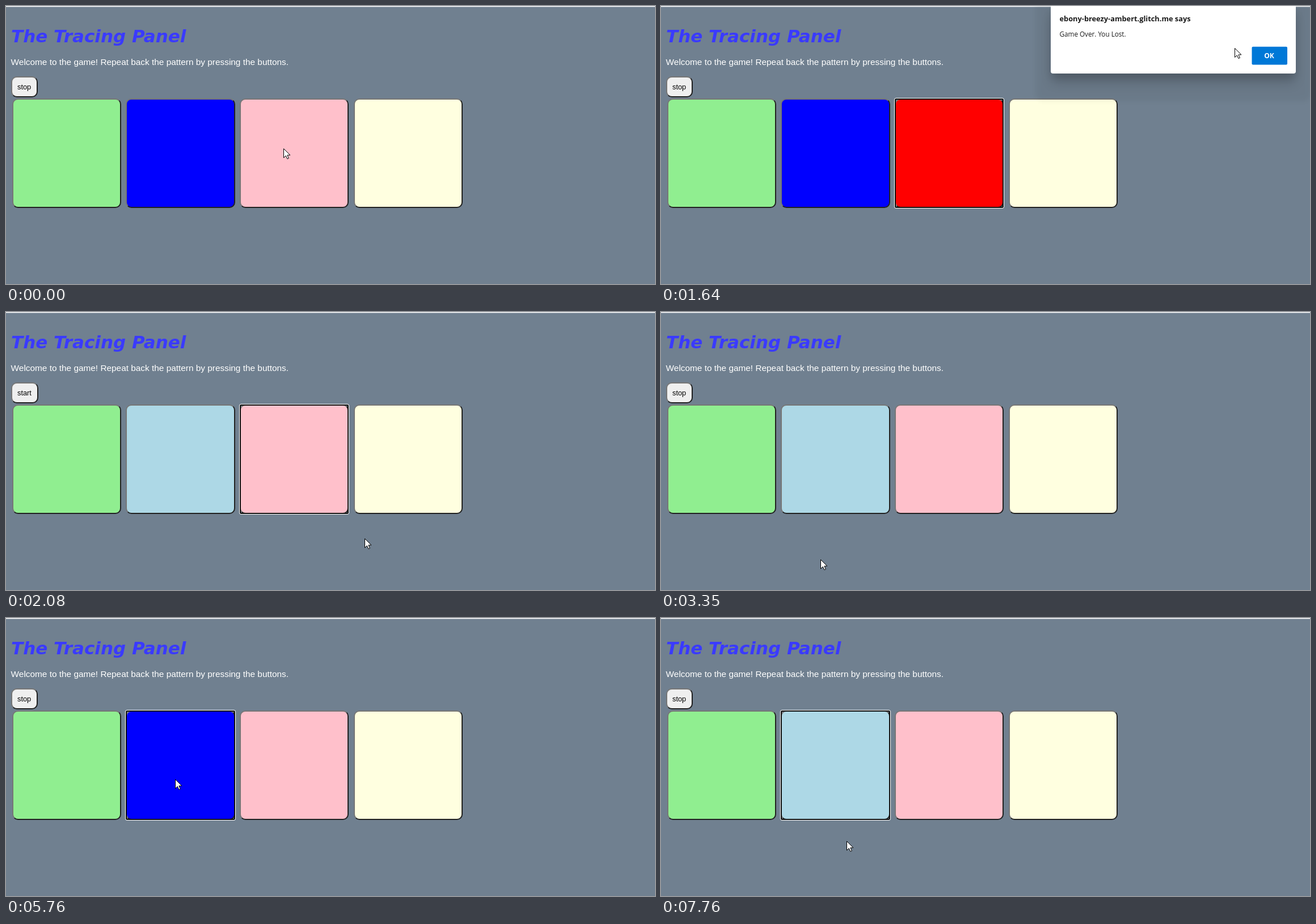
These frames come from a looping animation (1144 by 490 pixels, 8 s). An HTML page:

```html
<!DOCTYPE html>
<html lang="en">
<head>
<meta charset="utf-8">
<title>The Tracing Panel</title>
<style>
html, body { margin: 0; width: 100%; height: 100%; overflow: hidden; }
body { position: relative; background: #708090; }
svg { position: absolute; left: 0; top: 0; overflow: visible; }
text { white-space: pre; }
.strip { position: absolute; width: 100%; height: 1px; background: #fff; border-bottom: 1px solid #b9c1c9; }
.page text { font: 15.385px "Liberation Sans", sans-serif; fill: #fff; }
.page .title { font: italic bold 31px "DejaVu Sans", sans-serif; fill: #3a3aff; }
.tile, .toggle {
  position: absolute; box-sizing: border-box; border: 2px solid;
  border-color: #767676 #212121 #212121 #767676; border-radius: 10px;
}
.tile { top: 163.3px; width: 192.3px; height: 192.3px; }
.tile.focus::after {
  content: ""; position: absolute; inset: -2px; border: 2px solid #101010;
  border-radius: 3px; box-shadow: 0 0 0 1px #fff;
}
.toggle { left: 9px; top: 124px; height: 37px; background: #efefef; }
.toggle text { font: 12.8px "Liberation Sans", sans-serif; }
.dialog {
  position: absolute; left: 687px; top: 0; width: 432px; height: 119px;
  background: #fff; border-radius: 0 0 4px 4px;
  box-shadow: 0 6px 14px rgba(0,0,0,.12), 0 18px 20px -2px rgba(0,0,0,.16),
    0 22px 8px 27px rgba(0,0,0,.05);
}
.dialog text { font: 11.7px "Open Sans", sans-serif; fill: #1a1a1a; }
.dialog .host { font-weight: 700; font-size: 12.8px; }
.dialog .ok { font-weight: 700; font-size: 12px; fill: #fff; text-anchor: middle; }
</style>
</head>
<body>
<div class="strip"></div>
<svg class="page" width="1144" height="490">
  <text class="title" x="9" y="64">The Tracing Panel</text>
  <text x="8.6" y="104">Welcome to the game! Repeat back the pattern by pressing the buttons.</text>
</svg>
<div class="toggle"><svg width="40" height="30"><text id="label" x="9" y="21"></text></svg></div>
<div class="dialog">
  <svg width="432" height="119">
    <text class="host" x="15.5" y="27">ebony-breezy-ambert.glitch.me says</text>
    <text x="15.5" y="54">Game Over. You Lost.</text>
    <rect x="354.5" y="71.7" width="62.5" height="31.8" rx="2" fill="#0078d7"/>
    <text class="ok" x="385" y="92">OK</text>
  </svg>
</div>
<svg id="cursor" width="13" height="20">
  <path d="M.5.5V16.5L4.3 12.9 6.9 18.5 9.4 17.4 6.9 11.9H12Z" fill="#fff" stroke="#000"/>
</svg>
<script>
const LOOP = 8000;
const dialog = document.querySelector('.dialog');
const toggle = document.querySelector('.toggle');
const label = document.getElementById('label');
const cursor = document.getElementById('cursor');

const [, blue, pink] = ['#90ee90', '#add8e6', '#ffc0cb', '#ffffe0'].map((color, i) => {
  const tile = document.createElement('div');
  tile.className = 'tile';
  tile.style.left = 10.6 + 200.8 * i + 'px';
  tile.style.background = color;
  document.body.insertBefore(tile, dialog);
  return tile;
});

// Pointer gestures: start, end, target x, target y; the pointer rests in between.
const moves = [
  [250, 340, 502, 307], [450, 580, 535, 396], [580, 1040, 751, 87],
  [1060, 1640, 1011, 74], [1640, 1820, 1072, 85],
  [1870, 2080, 633, 400], [2080, 2590, 45, 140],
  [2690, 2960, 310, 451], [3300, 3350, 281, 436],
  [3590, 3890, 302, 423], [4480, 4530, 305, 412],
  [5570, 5740, 298, 284], [5820, 5970, 333, 396], [6660, 6770, 327, 393]
];

const clamp = v => Math.min(1, Math.max(0, v));
const progress = (t, from, to) => clamp((t - from) / (to - from));
const within = (t, from, to) => t >= from && t < to;

function pointAt(t) {
  let x = 489, y = 251;
  for (const [from, to, tx, ty] of moves) {
    const k = progress(t, from, to);
    x += (tx - x) * k;
    y += (ty - y) * k;
  }
  return [Math.round(x), Math.round(y)];
}

function render(t) {
  const cue = within(t, 3590, 4530) || within(t, 6770, 7760);
  const pressed = within(t, 5740, 5860);
  blue.style.background = t < 1880 || cue || pressed ? '#00f' : '#add8e6';
  blue.classList.toggle('focus', t >= 5730);
  pink.style.background = within(t, 340, 1880) ? '#f00' : '#ffc0cb';
  pink.classList.toggle('focus', within(t, 340, 2590));

  const idle = within(t, 1880, 2590);
  label.textContent = idle ? 'start' : 'stop';
  toggle.style.width = (idle ? 48 : 47) + 'px';

  // The dialog tilts and drops into place, then fades away.
  const tilt = (1 - progress(t, 370, 478)) ** 3;
  dialog.style.opacity = clamp(1 - 1.35 * tilt) * (1 - progress(t, 1870, 1970));
  dialog.style.transform = tilt
    ? `translateY(${-45 * tilt}px) perspective(800px) rotateX(${24 * tilt}deg)` : 'none';

  const [x, y] = pointAt(t);
  cursor.style.transform = `translate(${x}px, ${y}px)`;
}

const start = performance.now();
function tick() {
  render((performance.now() - start) % LOOP);
  requestAnimationFrame(tick);
}
tick();
</script>
</body>
</html>
```
